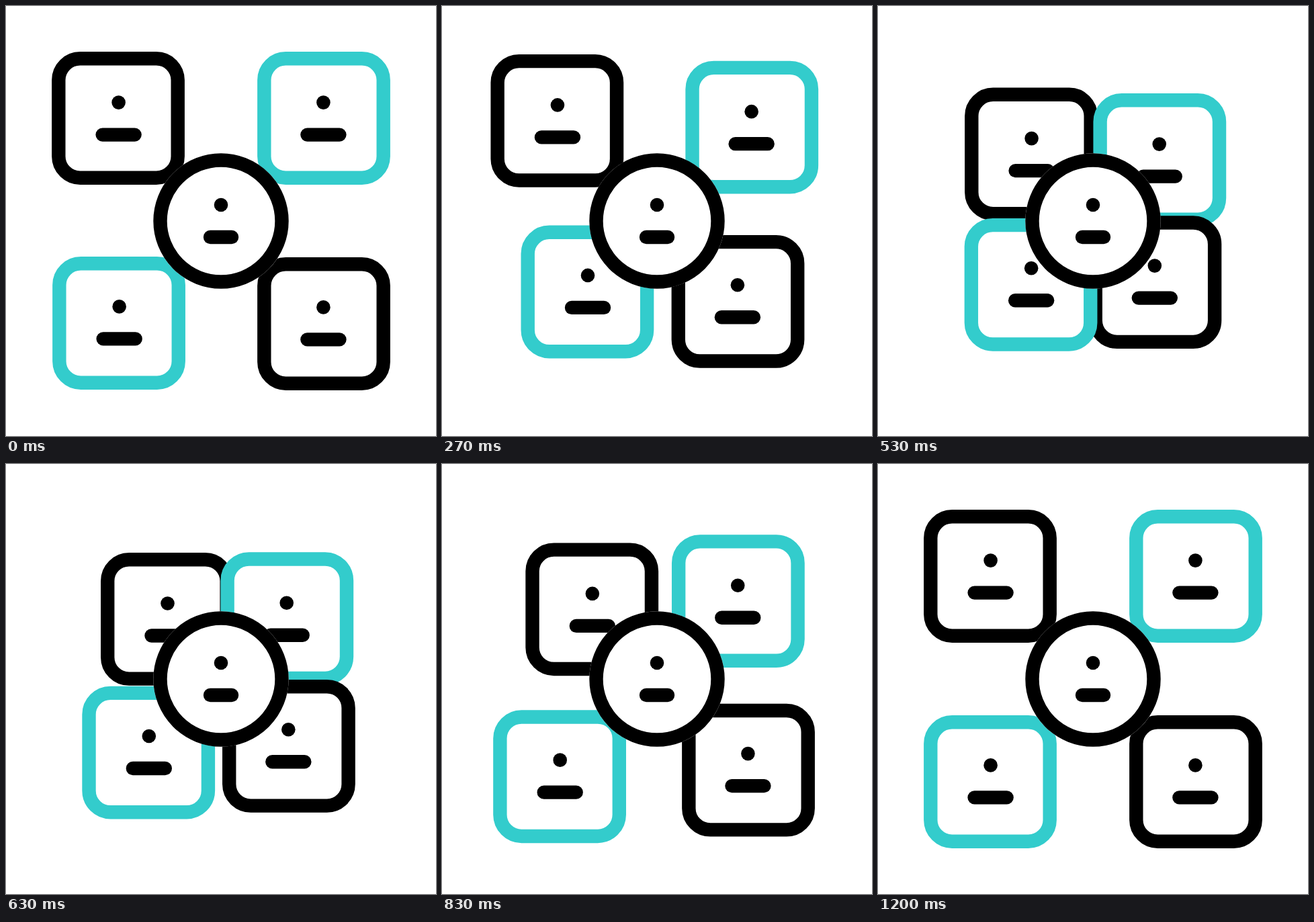
Write an HTML page that moves like this. It is 640 px wide and 640 px high and loops after 1670 ms.

```html
<!DOCTYPE html>
<html lang="en">
<head>
<meta charset="utf-8">
<title>Group</title>
<style>
  html, body { margin: 0; width: 100%; height: 100%; overflow: hidden; background: #fff; }
  svg { display: block; width: 100vw; height: 100vh; }
  .shape { fill: #fff; stroke: #000; stroke-width: 20.4; }
  .teal { stroke: #33cccc; }
  .bar { stroke: #000; stroke-width: 20.4; stroke-linecap: round; }
</style>
</head>
<body>
<svg viewBox="0 0 640 640">
  <g id="cards"></g>
  <circle cx="320" cy="320" r="100.7" fill="#fff"/>
  <circle class="shape" cx="320" cy="320" r="90.5"/>
  <circle cx="320" cy="296" r="10.3"/>
  <path class="bar" d="M304 344H336"/>
</svg>
<script>
const LOOP = 1670, STEP = 100 / 3;
const RISE = 13.5, FALL = 16.5;

// Back to front: side x, side y, start step, travel x, travel y, colour class
const cards = [
  [-1, -1, 6, 73.2, 64.2, ''],
  [1, -1, 4, 55.6, 64.2, 'teal'],
  [1, 1, 1, 61.6, 62.8, ''],
  [-1, 1, -1, 66.7, 64.1, 'teal']
].map(([sx, sy, start, dx, dy, tone]) => ({
  start, dx: -sx * dx, dy: -sy * dy, el: makeCard(sx, sy, tone)
}));

function makeCard(sx, sy, tone) {
  const el = document.createElementNS('http://www.w3.org/2000/svg', 'g');
  const x = 320 + sx * 152.4, y = sy * 152.4;
  el.innerHTML = `
    <rect class="shape ${tone}" x="${231.3 + sx * 153}" y="${231.3 + sy * 153}"
      width="177.4" height="177.4" rx="32"/>
    <circle cx="${x}" cy="${296 + y}" r="10.3"/>
    <path class="bar" d="M${x - 24} ${344 + y}h48"/>`;
  document.getElementById('cards').append(el);
  return el;
}

const smooth = s => s * s * (3 - 2 * s);

// cubic-bezier(.42, 0, .58, 1)
function easeInOut(x) {
  let lo = 0, hi = 1;
  for (let i = 0; i < 24; i++) {
    const s = (lo + hi) / 2;
    if (s * (1.26 + s * (0.52 * s - 0.78)) < x) lo = s; else hi = s;
  }
  return smooth(lo);
}

function travel(k) {
  if (k <= 0 || k >= RISE + FALL) return 0;
  return k < RISE ? smooth(k / RISE) : easeInOut((RISE + FALL - k) / FALL);
}

function draw(ms) {
  const step = Math.floor((ms % LOOP + 5) / STEP);
  for (const c of cards) {
    const p = travel(step - c.start);
    c.el.setAttribute('transform', `translate(${c.dx * p} ${c.dy * p})`);
  }
}

let t0;
function tick(now) {
  t0 ??= now;
  draw(Math.max(0, now - t0));
  requestAnimationFrame(tick);
}
draw(0);
requestAnimationFrame(tick);
</script>
</body>
</html>
```
